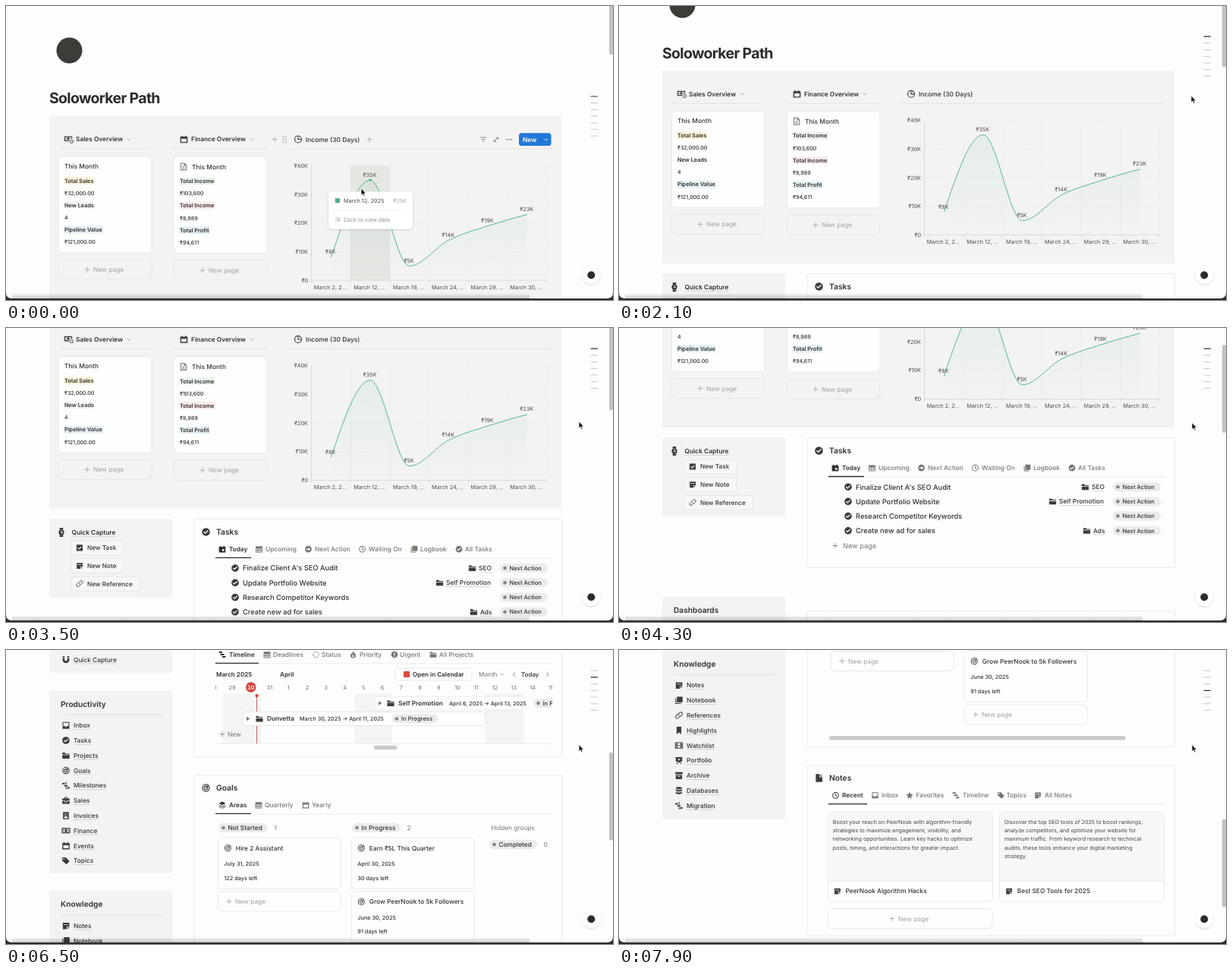
Recreate the animation shown at these times as an HTML page. Size 800x387 px, loop 8 s.

```html
<!DOCTYPE html>
<html lang="en">
<head>
<meta charset="utf-8">
<title>Dashboard scroll</title>
<style>
  html, body { margin: 0; width: 100%; height: 100%; overflow: hidden; background: #fdfdfd; }
  svg { display: block; width: 800px; height: 387px; font-family: Inter, sans-serif; text-rendering: geometricPrecision; }
</style>
</head>
<body>
<svg id="stage" viewBox="0 0 800 387"></svg>
<script>
const INK = '#32312e', DIM = '#777671', PALE = '#a3a29e', EDGE = '#e4e4e2', PANEL = '#f3f3f2';
const DISC = 'M8 1a7 7 0 1 0 0 14A7 7 0 1 0 8 1z';
const RING = DISC + 'M8 2.6a5.4 5.4 0 1 1 0 10.8A5.4 5.4 0 1 1 8 2.6z';

// 16 x 16 glyphs; "~" is stroked, ":" is stroked with dashes
const ICONS = {
  check: DISC + 'M6.8 11.6 3.4 8.4 4.7 7.1 6.8 9.1 11.2 4.7 12.5 6z',
  folder: 'M1 2.5h5l1.5 2H15V6H1zM1 7.2h14V14H1z',
  cal: 'M1 3h2.5V1h2v2h5V1h2v2H15v12H1zM3 7v6h10V7z',
  calDay: 'M1 3h2.5V1h2v2h5V1h2v2H15v12H1zM8 8v4h4V8z',
  table: 'M1 2h14v13H1zM2.5 7v2.5h3V7zM6.8 7v2.5h3V7zM11 7v2.5h2.6V7zM2.5 11v2.5h3V11zM6.8 11v2.5h3V11zM11 11v2.5h2.6V11z',
  next: DISC + 'M3.5 7h4.7V4.2L12.5 8l-4.3 3.8V9H3.5z',
  clock: RING + 'M7.2 4h1.6v3.6l2.6 1.7-.9 1.3-3.3-2.2z',
  pie: RING + 'M7.2 3h1.5v4.3H13v1.5H7.2z',
  book: 'M1 4h1.6v9.4H12V15H1zM4 1h11v11H4z',
  note: 'M2 2h12.5v7.5h-5v5H2zM10.7 14.5l3.8-3.8h-3.8zM4.2 5v1.3h8V5z',
  task: 'M1.5 1.5h13v13h-13zM7 11.8 3.5 8.3l1.3-1.3L7 9.2l4.4-4.4 1.3 1.3z',
  link: '~M7 9.5a3 3 0 0 0 4.2 0l2.5-2.5a3 3 0 0 0-4.3-4.3L8 4M9 6.5a3 3 0 0 0-4.2 0L2.3 9a3 3 0 0 0 4.3 4.3L8 12',
  bars: 'M1 1.5h7v3.2H1zM4 6.4h8v3.2H4zM8 11.3h7v3.2H8z',
  status: ':M8 2a6 6 0 1 0 0 12A6 6 0 1 0 8 2',
  fire: 'M8.5.8c.5 3.2 5 4.5 5 9a5.5 5.4 0 0 1-11 0c0-2.3 1.2-3.4 2-5 .4 1.4.8 2 1.7 2.3C6 4.6 6.9 2.5 8.5.8zM8 8c-3 3-2 5.4 0 5.4S11 11 8 8z',
  alert: DISC + 'M7 3.8h2V9H7zM7 10.4h2v2H7z',
  target: '~M8 1.8a6.2 6.2 0 1 0 0 12.4A6.2 6.2 0 1 0 8 1.8M8 4.8a3.2 3.2 0 1 0 0 6.4A3.2 3.2 0 1 0 8 4.8M8 7.5v1M8 8l5-5',
  layers: 'M8 .8l7 3.7-7 3.7-7-3.7zM1 7l7 3.7L15 7v1.6l-7 3.7-7-3.7zM1 10.8l7 3.7 7-3.7v1l-7 3.7-7-3.7z',
  star: 'M8 .8l2.2 4.8 5.2.6-3.9 3.5 1.1 5.2L8 12.3l-4.6 2.6 1.1-5.2L.6 6.2l5.2-.6z',
  tag: 'M1 1.5h6.5L15 9l-6 6.2L1 8zM4 3.3a1.2 1.2 0 1 0 .1 0z',
  inbox: 'M1.5 1.5h13v13h-13zM3 3v6.3h3l1 1.7h2l1-1.7h3V3z',
  list: '~M1.5 3.5l1 1 2-2M1.5 8.5l1 1 2-2M1.5 13.5l1 1 2-2M7 3.5h8M7 8.5h8M7 13.5h8',
  rows: '~M1 4h2M5 4h10M1 8h2M5 8h10M1 12h2M5 12h10',
  magnet: 'M1.5 1.5h4V8a2.5 2.5 0 0 0 5 0V1.5h4V8a6.5 6.5 0 0 1-13 0zM1.5 4v1.2h4V4zM10.5 4v1.2h4V4z',
  mile: 'M1 3h5v3H1zM5 7h6v3H5zM10 11h5v3h-5zM7.5 1H9v5H7.5zM7.5 11H9v4H7.5z',
  bag: 'M5 1.5h6V4h4v4H9.5v1.5h-3V8H1V4h4zM6.5 3v1h3V3zM1 9.2h4.5V11h5V9.2H15v5H1z',
  bill: 'M2.5 1h11v14h-11zM5 3.5v1.3h2.5V3.5zM9 3.5v1.3h2V3.5zM5 6.5v1.3h2.5V6.5zM9 6.5v1.3h2V6.5zM5 9.5V13h6V9.5z',
  cash: 'M0 3h16v10H0zM1.6 5v6h12.8V5zM8 5.5a2.5 2.5 0 1 0 .1 0zM2 7h2v2H2zM12 7h2v2h-2z',
  mark: 'M3.5 1h9v14.2L8 11.6l-4.5 3.6z',
  film: 'M.5 2h15v12H.5zM2 3.5v2h1.5v-2zM2 7v2h1.5V7zM2 10.5v2h1.5v-2zM5 3.5v3.8h6V3.5zM5 8.7v3.8h6V8.7zM12.5 3.5v2H14v-2zM12.5 7v2H14V7zM12.5 10.5v2H14v-2z',
  easel: 'M1 1.5h14V3h-1v7H9.5l4 4.5h-2L8 11l-3.5 3.5h-2l4-4.5H2V3H1zM6.5 4v4.3l4-2.1z',
  box: 'M1 1.5h14v4H1zM2 6.7h12v8H2zM5.5 8.5V10h5V8.5z',
  db: 'M8 1c4 0 6 1 6 2.2S12 5.4 8 5.4 2 4.4 2 3.2 4 1 8 1zM2 5.2c2 2 10 2 12 0v3c-2 2-10 2-12 0zM2 10c2 2 10 2 12 0v3c-2 2.6-10 2.6-12 0z',
  watch: 'M5 0h6v3.5H5zM8 3a5 5 0 1 0 .1 0zM5 12.5h6V16H5zM7.3 5.3h1.4v2.5h2v1.4H7.3z',
  page: '~M3 1.5h6.5l4 4v9H3zM9.5 1.5v4h4M5.5 8.5h5M5.5 11.5h5',
  file: 'M2.5 1H9v5.5h5V15H2.5zM10.2 1l3.8 4.3h-3.8z'
};

const text = (x, y, s, size = 8.3, weight = 500, fill = INK, extra = '') =>
  `<text x="${x}" y="${y + size * .36}" font-size="${size}" font-weight="${weight}" fill="${fill}" ${extra}>${s}</text>`;
const rect = (x, y, x2, y2, fill, r = 0, extra = '') =>
  `<rect x="${x}" y="${y}" width="${x2 - x}" height="${y2 - y}" rx="${r}" fill="${fill}" ${extra}/>`;
const box = (x, y, x2, y2, r = 5, fill = '#fefefe') => rect(x, y, x2, y2, fill, r, `stroke="${EDGE}" stroke-width=".8"`);
const stroke = (d, color = EDGE, w = .7, extra = '') =>
  `<path d="${d}" fill="none" stroke="${color}" stroke-width="${w}" ${extra}/>`;
const hline = (x, x2, y, color, w) => stroke(`M${x} ${y}H${x2}`, color, w);
const plus = (x, y, c = DIM) => stroke(`M${x - 3.5} ${y}h7m-3.5-3.5v7`, c, .8);
const chevron = (x, y, c = PALE) => stroke(`M${x - 2.5} ${y - 1.2}l2.5 2.5 2.5-2.5`, c, .9);
const dot = (x, y, r, c) => `<circle cx="${x}" cy="${y}" r="${r}" fill="${c}"/>`;
const link = (x, y, s, size, weight) => text(x, y, s, size, weight, INK, 'class="u"');

function icon(name, x, y, size = 10.5, color = '#3d3c39') {
  const d = ICONS[name], k = size / 16;
  const at = `transform="translate(${x - size / 2} ${y - size / 2}) scale(${k})"`;
  if (d[0] === '~') return stroke(d.slice(1), color, 1.5, at);
  if (d[0] === ':') return stroke(d.slice(1), color, 1.6, `stroke-dasharray="3 1.7" ${at}`);
  return `<path d="${d}" fill="${color}" fill-rule="evenodd" ${at}/>`;
}
const pill = (x, x2, y, s, size = 7.6) =>
  rect(x, y - 6, x2, y + 6, '#ebebe9', 6) + dot(x + 6.5, y, 2.3, '#85847f') + text(x + 12.5, y, s, size);
function tabs(y, list, end) {
  return hline(276, 720, y + 12, EDGE) + hline(276, end, y + 11.3, INK, 1.3) +
    list.map(([name, ix, tx, s], i) =>
      icon(name, ix, y, 10, i ? DIM : INK) + text(tx, y, s, i ? 8.4 : 8.2, i ? 500 : 600, i ? DIM : INK)).join('');
}
const panel = (y, y2, name, head, hy) =>
  box(248, y, 732.5, y2, 2, '#fdfdfd') + icon(name, 263.5, hy, 12) + text(277, hy, head, 10.3, 600);
function sideList(y, y2, head, items) {
  return rect(57, y, 219, y2, PANEL, 2) + text(72, y + 17.8, head, 10.2, 600) + hline(72, 206, y + 32, '#d9d9d7') +
    items.map(([name, s], i) => {
      const cy = y + 46 + 19.8 * i;
      return icon(name, 79, cy, 11) + link(89, cy, s);
    }).join('');
}
function stats(x, y, rows) {
  return rows.map(([label, value, bg], i) =>
    text(x, y + i * 32.2, label, 7.3, 600, INK, `class="hl" data-bg="${bg}"`) +
    text(x, y + 16.3 + i * 32.2, value, 7.1)).join('');
}
const newBox = (x, x2, y, px, size = 8.4) =>
  box(x, y - 13, x2, y + 13, 5, 'none') + plus(px, y, PALE) + text(px + 8, y, 'New page', size, 400, PALE);

function overview() {
  const head = 175.5;
  return rect(57, 145, 732, 398.7, PANEL, 1) +
    icon('cash', 82, head - .8, 10.5) + dot(86.4, 178, 3.4, PANEL) + icon('clock', 86.4, 178, 6) +
    text(92, head, 'Sales Overview', 8.3, 600) + chevron(162, head) +
    icon('cal', 234.5, head, 11) + text(244, head, 'Finance Overview', 8.3, 600) + chevron(324, head) +
    icon('pie', 385, head, 11.5) + text(395, head, 'Income (30 Days)', 8.45) +
    hline(69, 192, 188, '#dededc') + hline(221, 344, 188, '#dededc') + hline(373, 720, 188, '#dededc') +
    box(69.3, 198, 192, 325) + box(221.3, 198, 344, 325.5) +
    text(77, 211, 'This Month', 8.4) + icon('page', 234, 211.5, 11, DIM) + text(245, 211.5, 'This Month', 8.4) +
    stats(77, 230, [['Total Sales', '₹32,000.00', '#faf1d6'], ['New Leads', '4', '#f4f4f3'], ['Pipeline Value', '₹121,000.00', '#e4eff4']]) +
    stats(229, 230.5, [['Total Income', '₹103,600', '#eaf2ec'], ['Total Income', '₹8,989', '#faeaea'], ['Total Profit', '₹94,611', '#e4eff4']]) +
    newBox(69.3, 192, 347, 107) + newBox(221.3, 344, 348, 259);
}

const COL = 51.7, LEFT = 402.5;
function chart() {
  const values = [8, 35, 5, 14, 19, 23], days = ['2, 2', '12, ', '19, ', '24, ', '29, ', '30, '];
  const slopes = [-2.95, 0, 0, -.51, -.33, -.27];
  const px = i => LEFT + (i + .5) * COL, py = i => 361 - values[i] * 3.7625;
  let curve = `M${px(0)} ${py(0)}`;
  for (let i = 1; i < 6; i++) {
    const h = COL / 3;
    curve += `C${px(i - 1) + h} ${py(i - 1) + slopes[i - 1] * h} ${px(i) - h} ${py(i) - slopes[i] * h} ${px(i)} ${py(i)}`;
  }
  const mid = 'text-anchor="middle"', dash = 'stroke-dasharray="2 2"';
  let s = `<g id="band">${rect(454, 210, 506, 361, '#e6e6e3')}</g>`;
  for (let i = 0; i < 5; i++) {
    const y = 361 - i * 37.65;
    s += stroke(`M${LEFT} ${y}H713`, i ? '#e5e5e3' : '#cfcfcc', .7, i ? dash : '') +
      text(398, y, `₹${i ? i * 10 + 'K' : 0}`, 7.3, 400, '#4f4e4a', 'text-anchor="end"');
  }
  for (let i = 0; i < 7; i++) {
    const x = LEFT + i * COL;
    s += stroke(`M${x} 210.4V361`, i ? '#e5e5e3' : '#cfcfcc', .7, i ? dash : '') + stroke(`M${x} 361v3`, '#cfcfcc');
  }
  s += `<path d="${curve}V361H${px(0)}z" fill="url(#area)"/>` + stroke(curve, '#4fb286', .95);
  values.forEach((v, i) => {
    s += text(px(i) - .6, py(i) - 7.2, `₹${v}K`, 7.3, 400, '#4f4e4a', mid) +
      text(px(i) - 1, 370, `March ${days[i]}...`, 7.3, 400, '#4f4e4a', mid);
  });
  return s;
}

function tasks() {
  const rows = [['Finalize Client A\'s SEO Audit', 'SEO', 623], ['Update Portfolio Website', 'Self Promotion', 580],
    ['Research Competitor Keywords'], ['Create new ad for sales', 'Ads', 625]];
  const buttons = [['task', 'New Task', 154.5], ['note', 'New Note', 155], ['link', 'New Reference', 177]];
  return rect(57, 411.6, 219, 516, PANEL, 2) + icon('watch', 73, 429.6, 12) + link(86.5, 429.6, 'Quick Capture', 8.4, 600) +
    buttons.map(([name, s, x2], i) => {
      const y = 450 + i * 23.6;
      return box(85.5, y - 9.3, x2, y + 9.3, 3, '#f7f7f6') + icon(name, 97, y, 10) + text(107, y, s, 8.2);
    }).join('') +
    panel(412, 583, 'check', 'Tasks', 429) +
    tabs(451.7, [['calDay', 285, 294, 'Today'], ['table', 333.5, 342, 'Upcoming'], ['next', 398.5, 407, 'Next Action'],
      ['clock', 469.5, 478, 'Waiting On'], ['book', 538, 546, 'Logbook'], ['check', 597, 605, 'All Tasks']], 323) +
    rows.map(([s, tag, x], i) => {
      const y = 476.7 + i * 19.2;
      return icon('check', 302, y, 11) + text(312, y, s, 9.3) + pill(651, 714, y, 'Next Action') +
        (tag ? icon('folder', x - 8.5, y, 10.5) + link(x, y, tag, 8.4) : '');
    }).join('') + plus(285, 554, DIM) + text(295, 554, 'New page', 9.2, 400, DIM);
}

function projects() {
  let s = panel(640.5, 815.5, 'folder', 'Projects', 657.5) +
    tabs(680.5, [['bars', 285, 294, 'Timeline'], ['table', 344, 352, 'Deadlines'], ['status', 408.5, 416, 'Status'],
      ['fire', 457.5, 466, 'Priority'], ['alert', 512, 519, 'Urgent'], ['folder', 563, 571, 'All Projects']], 333) +
    text(277, 706.5, 'March 2025', 8.1, 600) + text(361, 706.5, 'April', 8.1, 600) +
    box(513, 698.3, 614, 714.7, 3) + rect(524, 702.5, 532, 710.5, '#d9483f', 1) + text(536, 706.5, 'Open in Calendar', 8.1, 600) +
    text(623, 706.5, 'Month', 8.2, 400, DIM) + chevron(654, 706.5) +
    stroke('M671 703.8l-2.5 2.7 2.5 2.7M712.5 703.8l2.5 2.7-2.5 2.7', DIM, .9) + text(679, 706.5, 'Today', 8) +
    '<g clip-path="url(#span)">';
  for (const x of [286, 459, 632]) s += rect(x, 732, x + 50, 798, '#f4f4f3');
  for (let i = -1; i < 18; i++) {
    const x = 298 + i * 24.75, now = i === 1;
    if (now) s += dot(x, 723.5, 6.7, '#d1443c');
    s += text(x, 723.5, i < 3 ? 29 + i : i - 2, 7.2, now ? 600 : 400, now ? '#fff' : '#6b6a66', 'text-anchor="middle"');
  }
  const bar = (x, x2, y, name, nx, date, dx, px) =>
    box(x, y - 9, x2, y + 9, 4) + `<path d="M${x + 5} ${y - 2.7}l4.5 2.7-4.5 2.7z" fill="#7d7c78"/>` +
    icon('folder', nx - 10, y, 10.5) + text(nx, y, name, 8.25, 600) + text(dx, y, date, 7.2) + pill(px, px + 61, y, 'In Progress');
  return s + stroke('M330.6 734V798', '#b9605a', 1) + dot(330.6, 734.6, 2.2, '#d1443c') +
    bar(486, 682, 744.5, 'Self Promotion', 517, 'April 6, 2025 → April 13, 2025', 584, 695) +
    bar(312, 631.5, 765, 'Dunvetta', 344, 'March 30, 2025 → April 11, 2025', 387, 508.5) +
    plus(285, 785.5, DIM) + text(292, 785.5, 'New', 8.4, 400, DIM) + hline(276, 720, 798, EDGE) + '</g>' +
    rect(485, 800.3, 515.5, 805.5, '#c8c8c6', 2.6);
}

function goals() {
  const card = (x, y, s, date, left) => box(x, y, x + 162, y + 66.8) + icon('target', x + 13, y + 13.5, 10.5) +
    text(x + 23.5, y + 13.5, s, 8.3) + text(x + 8, y + 34.3, date, 7.3) + text(x + 8, y + 53, left, 7.3);
  return panel(839.5, 1119, 'target', 'Goals', 856) +
    tabs(878.5, [['layers', 285, 294, 'Areas'], ['table', 333, 341, 'Quarterly'], ['cal', 395, 403, 'Yearly']], 323) +
    pill(280, 345, 908.5, 'Not Started', 8.3) + text(353.5, 908.5, '1', 8.3, 400, DIM) +
    pill(456, 519.5, 908.5, 'In Progress', 8.3) + text(528.5, 908.5, '2', 8.3, 400, DIM) +
    text(639.5, 908.5, 'Hidden groups', 8.2, 400, DIM) +
    pill(637, 700, 930.5, 'Completed', 8.3) + text(708.5, 930.5, '0', 8.3, 400, DIM) +
    card(279.3, 921.7, 'Hire 2 Assistant', 'July 31, 2025', '122 days left') +
    card(455.3, 921.7, 'Earn ₹5L This Quarter', 'April 30, 2025', '30 days left') +
    card(455.3, 992.3, 'Grow PeerNook to 5k Followers', 'June 30, 2025', '91 days left') +
    newBox(279.3, 441, 1005.5, 294) + newBox(455.3, 617, 1076, 470) + rect(277, 1104.3, 667.5, 1109.5, '#c8c8c6', 2.6);
}

function notes() {
  const card = (x, title, lines) => box(x, 1204.5, x + 217, 1322) + rect(x + .4, 1204.9, x + 216.6, 1295, '#f7f7f6', 4) +
    hline(x, x + 217, 1295, EDGE) + lines.map((s, i) => text(x + 6.5, 1217.6 + i * 11.15, s, 7.2, 400, '#444340')).join('') +
    icon('note', x + 12.5, 1308.5, 10) + text(x + 23.2, 1308.3, title, 8.3);
  return panel(1143, 1367, 'file', 'Notes', 1159.5) +
    tabs(1182.3, [['clock', 285.5, 294, 'Recent'], ['inbox', 337.5, 346, 'Inbox'], ['star', 383, 391.5, 'Favorites'],
      ['bars', 444, 453, 'Timeline'], ['tag', 503.5, 510.5, 'Topics'], ['note', 552, 561, 'All Notes']], 327) +
    card(275.3, 'PeerNook Algorithm Hacks', ['Boost your reach on PeerNook with algorithm-friendly',
      'strategies to maximize engagement, visibility, and', 'networking opportunities. Learn key hacks to optimize',
      'posts, timing, and interactions for greater impact.']) +
    card(501.5, 'Best SEO Tools for 2025', ['Discover the top SEO tools of 2025 to boost rankings,',
      'analyze competitors, and optimize your website for', 'maximum traffic. From keyword research to technical',
      'audits, these tools enhance your digital marketing', 'strategy.']) +
    newBox(275.3, 492, 1344.5, 360);
}

function sidebar() {
  return sideList(621.5, 704.5, 'Dashboards', [['list', 'Get Things Done'], ['magnet', 'Quick Capture']]) +
    sideList(727.7, 968.5, 'Productivity', [['inbox', 'Inbox'], ['check', 'Tasks'], ['folder', 'Projects'], ['target', 'Goals'],
      ['mile', 'Milestones'], ['bag', 'Sales'], ['bill', 'Invoices'], ['cash', 'Finance'], ['cal', 'Events'], ['tag', 'Topics']]) +
    sideList(991.5, 1213.5, 'Knowledge', [['note', 'Notes'], ['book', 'Notebook'], ['link', 'References'], ['mark', 'Highlights'],
      ['film', 'Watchlist'], ['easel', 'Portfolio'], ['box', 'Archive'], ['db', 'Databases'], ['mile', 'Migration']]);
}

function toolbar() {
  let grip = '';
  for (let i = 0; i < 6; i++) grip += dot(365.3 + i % 2 * 3.4, 172.3 + (i >> 1) * 3.3, .9, PALE);
  return plus(354, 175.5, PALE) + grip + plus(479, 175.5, PALE) +
    stroke('M625 173h8m-6.5 2.7h5m-3.5 2.7h2M643.5 178.3l5-5m-2.5 0h2.7v2.7m-2.7 2.4h-2.7v-2.7', DIM, .9) +
    [660.4, 663.4, 666.4].map(x => dot(x, 175.7, .9, DIM)).join('') +
    rect(676, 167.2, 718.5, 184, '#2378d8', 3.5) + stroke('M705 167.2V184', '#1c67bd', .6) +
    text(681, 175.8, 'New', 8.4, 600, '#fff') + chevron(711.7, 175.8, '#fff');
}
const tooltip = () => dot(480, 229, 1.8, '#4fb286') + rect(425, 244.3, 536, 293.5, '#fff', 5, 'filter="url(#soft)"') +
  rect(433.8, 253, 440, 259.3, '#4fb286', 1) + text(445, 256.3, 'March 12, 2025', 7.3, 400, '#4a4945') +
  text(528, 256.3, '₹35K', 7.3, 400, PALE, 'text-anchor="end"') + hline(433, 528, 269, '#ececea') +
  icon('rows', 437, 281, 8, PALE) + text(445, 281.3, 'Click to view data', 7.3, 400, '#94938f');

const stage = document.getElementById('stage');
stage.innerHTML = `<defs>
  <linearGradient id="area" x2="0" y2="1"><stop stop-color="#4fb286" stop-opacity=".09"/><stop offset="1" stop-color="#4fb286" stop-opacity="0"/></linearGradient>
  <linearGradient id="shade" x2="0" y2="1"><stop stop-opacity="0"/><stop offset="1" stop-opacity=".2"/></linearGradient>
  <filter id="soft" x="-20%" y="-30%" width="140%" height="170%"><feDropShadow dx="0" dy="1" stdDeviation="1.6" flood-opacity=".16"/></filter>
  <clipPath id="span"><rect x="276" y="690" width="444" height="130"/></clipPath></defs>
  <g id="page">${dot(83.5, 58.5, 17, '#3d3c39') + text(57, 121.3, 'Soloworker Path', 19.5, 700, '#2c2b28', 'letter-spacing="-.7"') +
    overview() + chart() + tasks() + sidebar() + projects() + goals() + notes()}
    <g id="tools">${toolbar()}</g><g id="tip">${tooltip()}</g></g>
  <g id="toc">${[...Array(7).keys()].map(i => rect(770.5, i * 8.7 - .6, 780, i * 8.7 + .6, '#cfcfcd', .6)).join('')}</g>
  <g id="thumb">${rect(795, 0, 800, 116, '#c2c2c1', 2.5)}</g>
  <circle cx="771.3" cy="354.3" r="11.5" fill="#fff" filter="url(#soft)"/>${dot(771.3, 354.3, 5, '#2c2b28')}
  ${rect(8, 378, 690, 385, 'url(#shade)')}
  <path d="M0 377V387H800V377Q800 385 792 385H8Q0 385 0 377z" fill="#2c2b2d"/>
  <path id="cursor" d="M0 0V9.2L2.1 7.3 3.6 10.6 5.1 9.9 3.7 6.8H6.6z" fill="#111" stroke="#fff" stroke-width=".8"/>`;

// underlines and highlights take their width from the text
for (const el of stage.querySelectorAll('.u, .hl')) {
  const b = el.getBBox(), y = +el.getAttribute('y');
  const bg = el.dataset.bg;
  el.insertAdjacentHTML('beforebegin', bg
    ? rect(b.x - .5, y - 7.4, b.x + b.width + .5, y + 2.4, bg, 1)
    : hline(b.x, b.x + b.width, y + 2.2, '#bdbdba', .6));
}

// monotone cubic through [time, value] pairs
function track(pts) {
  const sec = pts.slice(1).map((p, i) => (p[1] - pts[i][1]) / (p[0] - pts[i][0]));
  const tan = pts.map((_, i) => {
    const a = sec[i - 1] ?? sec[i], b = sec[i] ?? a;
    return a * b > 0 ? 2 * a * b / (a + b) : 0;
  });
  return t => {
    let i = 0;
    while (i < pts.length - 2 && t >= pts[i + 1][0]) i++;
    const [t0, v0] = pts[i], [t1, v1] = pts[i + 1], h = t1 - t0, u = Math.min(1, (t - t0) / h);
    return v0 + (v1 - v0) * u * u * (3 - 2 * u) + h * u * (1 - u) * (tan[i] * (1 - u) - tan[i + 1] * u);
  };
}
const scroll = track([[0, 0], [1500, 0], [1800, 8], [2100, 59.7], [2800, 100], [3500, 160.6], [4300, 267.5],
  [5300, 426.5], [5800, 502], [5900, 502], [6500, 674.5], [7900, 991]]);
const cursorX = track([[0, 468], [100, 468], [1100, 754], [2100, 754], [3500, 755], [8000, 755]]);
const cursorY = track([[0, 240], [100, 240], [1100, 118], [2100, 118], [3500, 123], [4300, 124.5], [8000, 124.5]]);

const part = id => document.getElementById(id);
const move = (id, x, y) => part(id).setAttribute('transform', `translate(${x} ${y})`);
const show = (id, on) => part(id).setAttribute('visibility', on ? 'visible' : 'hidden');
const heads = [639, 745, 1009];

function draw(now) {
  const t = Math.floor(now % 8000 / 100) * 100; // ten steps a second
  const s = scroll(t), x = cursorX(t);
  move('page', 0, -s);
  move('thumb', 0, -52 + .277 * s);
  move('toc', 0, Math.max(27.2, 119 - 1.32 * s));
  move('cursor', x, cursorY(t));
  show('tip', x < 506);
  show('band', x < 506);
  show('tools', x < 732);
  const active = heads.filter(y => y < s + 60).length;
  [...part('toc').children].forEach((el, i) => el.setAttribute('fill', i === active ? '#32312e' : '#cfcfcd'));
  requestAnimationFrame(draw);
}
draw(performance.now());
</script>
</body>
</html>
```
